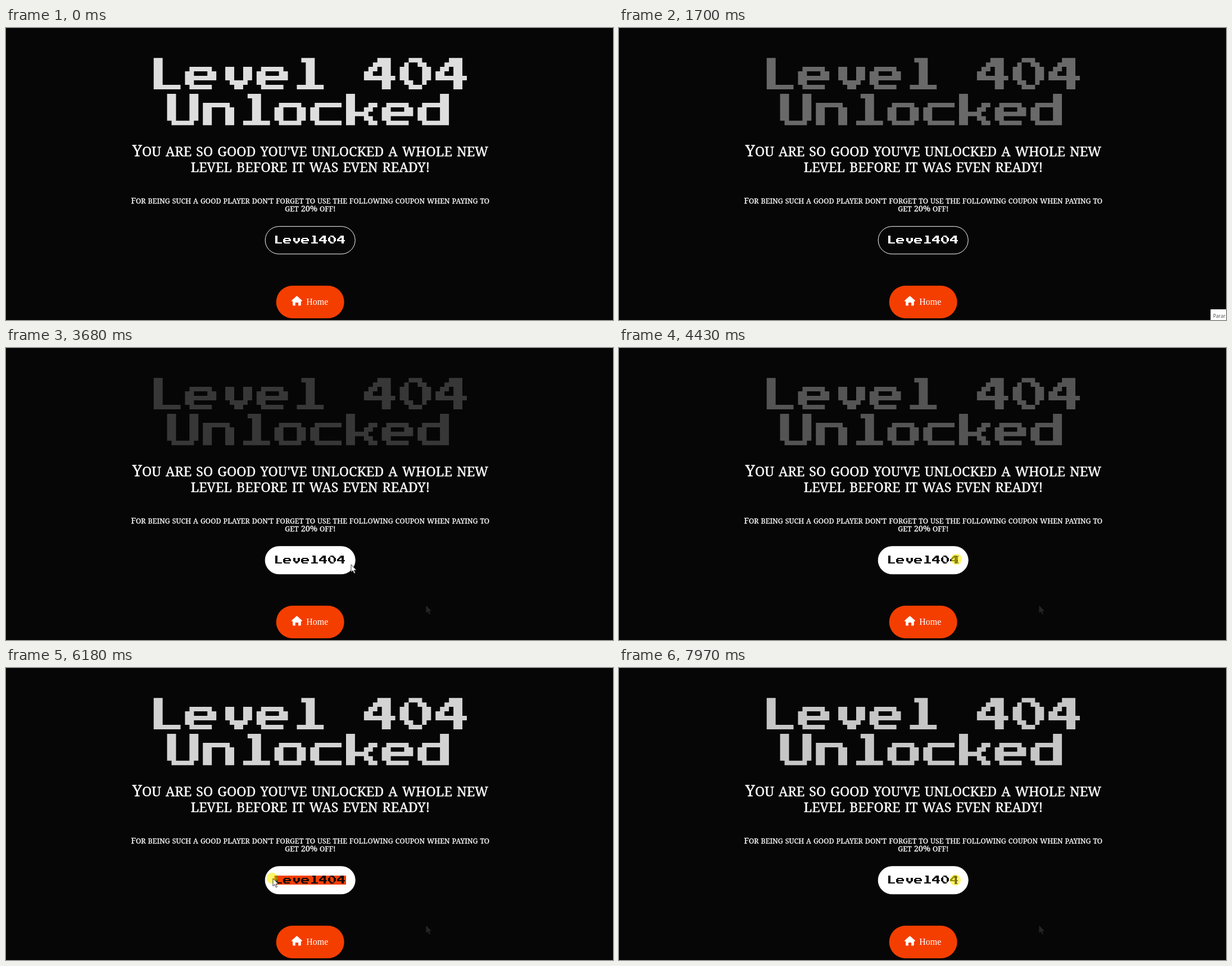
These frames come from a looping animation (1080x519 px, 8000 ms). An HTML page:

```html
<!DOCTYPE html>
<html lang="en">
<head>
<meta charset="utf-8">
<title>Level 404</title>
<style>
  html, body { margin: 0; width: 100%; height: 100%; overflow: hidden; background: #060606; }
  svg { display: block; width: 100vw; height: 100vh; }
  .slab { font-family: "Noto Serif", serif; fill: #fff; stroke: #fff; text-anchor: middle; }
  .lead { font-size: 23.3px; word-spacing: 2px; stroke-width: .4; }
  .lead tspan { font-size: 27.5px; }
  .note { font-size: 12.55px; font-weight: 500; word-spacing: .7px; stroke-width: .3; }
  .note tspan { font-size: 14.6px; }
  .pixel { fill-rule: evenodd; shape-rendering: geometricPrecision; }
</style>
</head>
<body>
<svg viewBox="0 0 1080 519" xmlns="http://www.w3.org/2000/svg">
  <defs>
    <path id="arrow" d="M0 0v13.6l3.1-2.9 2.2 5 2.2-1-2.2-4.8h4.3z"/>
  </defs>
  <rect width="1080" height="519" fill="#060606"/>
  <g id="title" class="pixel" fill="#fff" role="img" aria-label="Level 404 Unlocked"></g>

  <g class="slab lead">
    <text x="541.5" y="228"><tspan>Y</tspan>OU ARE SO GOOD YOU'VE UNLOCKED A WHOLE NEW</text>
    <text x="541.5" y="256">LEVEL BEFORE IT WAS EVEN READY!</text>
  </g>
  <g class="slab note">
    <text x="541.3" y="312"><tspan>F</tspan>OR BEING SUCH A GOOD PLAYER DON'T FORGET TO USE THE FOLLOWING COUPON WHEN PAYING TO</text>
    <text x="541.3" y="326">GET <tspan>20%</tspan> OFF!</text>
  </g>

  <rect id="pill" x="461.2" y="352.7" width="160" height="49" rx="24.5" stroke="#fff"/>
  <rect id="selection" y="369" height="16" fill="#f43e00"/>
  <g id="coupon" class="pixel" role="img" aria-label="Level404"></g>

  <rect x="480.7" y="458" width="121" height="58" rx="29" fill="#f43e00"/>
  <path transform="translate(0 -.6)" fill="#fff" d="M516.6 477.4q.9-.8 1.8 0l8.2 7.4q1 1.4-.6 1.6h-1.2v6q0 1.6-1.6 1.6h-3v-4.5q0-1-1-1h-3.4q-1 0-1 1v4.5h-3q-1.6 0-1.6-1.6v-6h-1.2q-1.6-.2-.6-1.6z"/>
  <text x="534.3" y="492" font-family="Liberation Serif, serif" font-size="16" fill="#fff">Home</text>

  <use id="ghost" href="#arrow" x="747.5" y="457.5" fill="#252525"/>
  <g id="tooltip">
    <rect x="1052.5" y="500" width="40" height="30" fill="#fff"/>
    <text x="1057" y="515" font-family="Open Sans, sans-serif" font-size="8.7" fill="#444">Parar</text>
  </g>

  <circle id="press" r="9.8" fill="#fff000" opacity=".57"/>
  <use id="pointer" href="#arrow" fill="#fff" stroke="#222" stroke-width=".9"/>
  <path id="beam" d="M-2.5-6h2l.5.5.5-.5h2M0-5.5v11M-2.5 6h2l.5-.5.5.5h2" fill="none" stroke="#333"/>
</svg>
<script>
const LOOP = 8000;
const $ = id => document.getElementById(id);

// Letter outlines on a grid of 8 by 8 units
const glyphs = {
  L: 'M1 0h2v6h4v1h-6z',
  e: 'M1 2h5v1h1v2h-5v1h4v1h-5v-1h-1v-3h1zM2 3v1h3v-1z',
  v: 'M1 2h2v3h2v-3h2v3h-1v1h-1v1h-2v-1h-1v-1h-1z',
  l: 'M2 0h3v6h2v1h-6v-1h2v-5h-1z',
  4: 'M3 0h3v4h1v1h-1v2h-2v-2h-4v-2h1v-1h1v-1h1zM3 2v1h-1v1h2v-2z',
  0: 'M2 0h3v1h1v1h1v3h-1v1h-1v1h-3v-1h-1v-1h-1v-3h1v-1h1zM2 1v4h1v1h2v-4h-1v-1z',
  U: 'M0 0h2v6h3v-6h2v6h-1v1h-5v-1h-1z',
  n: 'M0 2h6v1h1v4h-2v-4h-3v4h-2z',
  o: 'M1 2h5v1h1v3h-1v1h-5v-1h-1v-3h1zM2 3v3h3v-3z',
  c: 'M1 2h6v1h-5v3h5v1h-6v-1h-1v-3h1z',
  k: 'M0 0h2v4h2v-1h1v-1h2v1h-1v1h-1v1h1v1h1v1h-2v-1h-1v-1h-2v2h-2z',
  d: 'M5 0h2v7h-6v-1h-1v-3h1v-1h4zM2 3v3h3v-3z'
};

function write(parent, text, x, y, unit) {
  [...text].forEach((letter, i) => {
    if (!glyphs[letter]) return;
    const path = document.createElementNS('http://www.w3.org/2000/svg', 'path');
    path.setAttribute('d', glyphs[letter]);
    path.setAttribute('transform', `translate(${x + i * 8 * unit} ${y}) scale(${unit})`);
    parent.append(path);
  });
}

const TEXT_LEFT = 477, TEXT_RIGHT = 605, CELL = 16;
write($('title'), 'Level 404', 254.8, 53.2, 7.96);
write($('title'), 'Unlocked', 286.6, 117, 7.96);
write($('coupon'), 'Level404', TEXT_LEFT, 369, 2);

// Pointer keys: time, x, y
const entry = [
  [2050, 1044, 515], [2190, 870, 488], [2330, 747.5, 457.5], [2400, 697, 449],
  [2470, 650, 430], [2540, 632, 411], [2610, 614, 385]
];
const drag = [
  [3850, 614, 385], [4100, 602, 376], [4750, 602, 376],
  [5750, 475, 374], [6700, 475, 374], [7570, 600, 377.5]
];

const clamp = v => Math.max(0, Math.min(1, v));
const smooth = v => v * v * (3 - 2 * v);

function follow(keys, t, ease) {
  if (t <= keys[0][0]) return keys[0].slice(1);
  for (let i = 1; i < keys.length; i++) {
    const [t0, x0, y0] = keys[i - 1], [t1, x1, y1] = keys[i];
    if (t < t1) {
      const k = ease((t - t0) / (t1 - t0));
      return [x0 + (x1 - x0) * k, y0 + (y1 - y0) * k];
    }
  }
  return keys[keys.length - 1].slice(1);
}

const show = (id, on) => $(id).setAttribute('visibility', on ? 'visible' : 'hidden');
const gray = v => `rgb(${v},${v},${v})`;

function draw(t) {
  // Ticks shorten slightly over the loop, and the blink advances a little less on each
  const tick = Math.floor(t / (71 - 0.00029 * t));
  const phase = (0.063 + tick * (0.0685 - 0.000009 * tick)) % 1;
  $('title').setAttribute('opacity', Math.abs(1 - 2 * phase));

  const hover = smooth(clamp((t - 2780) / 850));
  $('pill').setAttribute('fill', gray(Math.round(6 + 249 * hover)));
  $('coupon').setAttribute('fill', gray(Math.round(255 - 243 * hover)));

  const [x, y] = t < 2610 ? follow(entry, t, k => k) : follow(drag, t, smooth);
  const pressed = t >= 4300;
  const onText = t > 3950 && x > TEXT_LEFT;
  const place = `translate(${x} ${y})`;
  show('pointer', t >= 2030 && !onText);
  show('beam', onText);
  show('press', pressed);
  $('pointer').setAttribute('transform', place);
  $('beam').setAttribute('transform', place);
  $('press').setAttribute('transform', `translate(${x - 1.5} ${y - 0.5})`);

  // Selection trails the pointer and snaps to letter edges
  const trail = follow(drag, t - 130, smooth)[0];
  const edge = TEXT_LEFT + CELL * Math.round((trail - TEXT_LEFT) / CELL);
  $('selection').setAttribute('x', edge);
  $('selection').setAttribute('width', pressed ? Math.max(0, TEXT_RIGHT - edge) : 0);

  show('tooltip', t >= 1350 && t < 2000);
  show('ghost', t >= 2400);
}

const start = performance.now();
function frame() {
  draw((performance.now() - start) % LOOP);
  requestAnimationFrame(frame);
}
frame();
</script>
</body>
</html>
```
